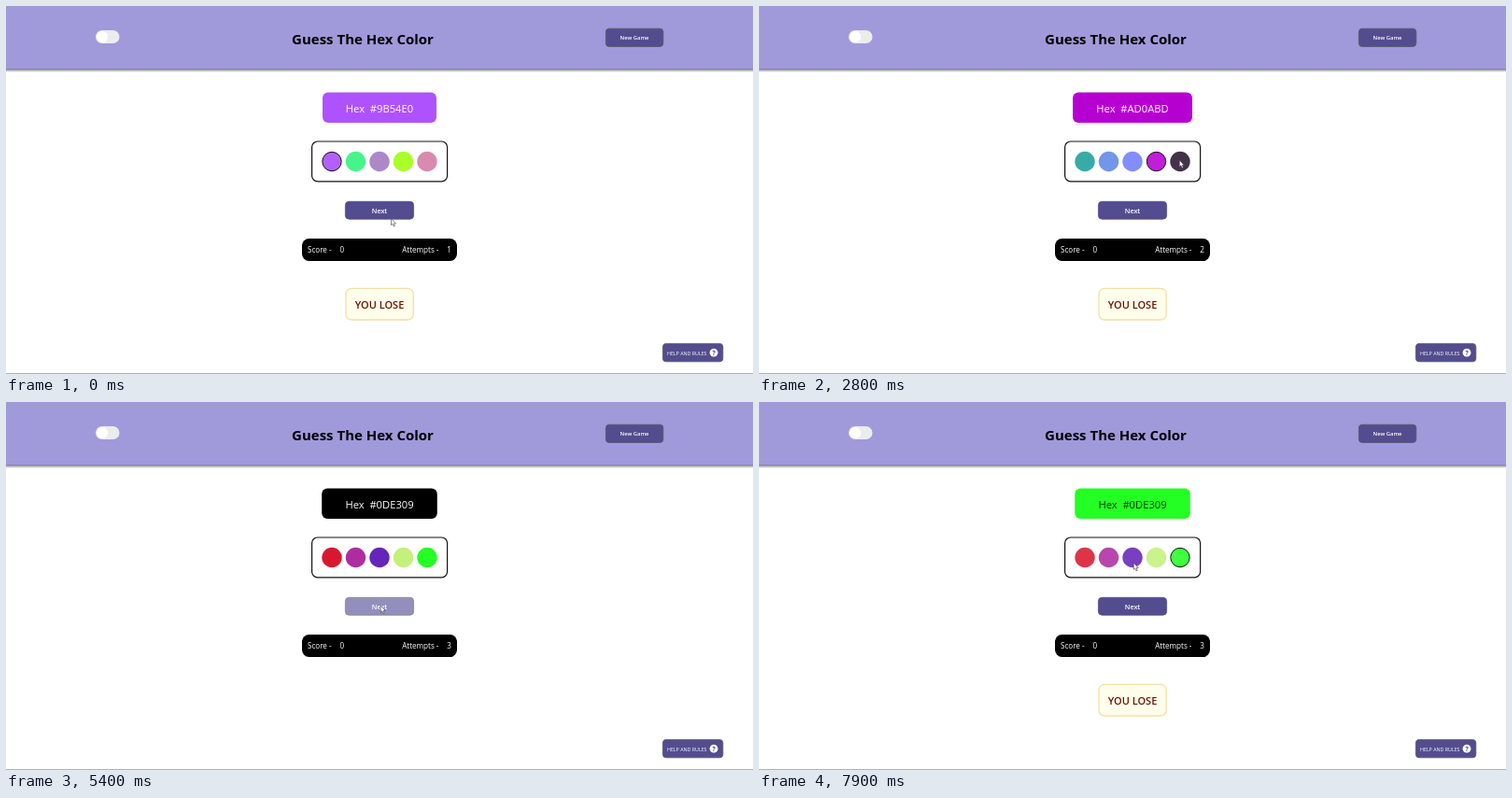
Animation, 800 px wide and 394 px high, one loop 8 s. Source, as an HTML page:

```html
<!DOCTYPE html>
<html lang="en">
<head>
<meta charset="utf-8">
<title>Guess The Hex Color</title>
<style>
  html, body { margin: 0; width: 100%; height: 100%; overflow: hidden; background: #fff; }
  svg { display: block; width: 800px; height: 394px; }
  text { font-family: "Open Sans", "Noto Sans", sans-serif; fill: #fff; white-space: pre; }
  .mid { text-anchor: middle; }
  .btn { fill: #534d8f; stroke: #56565f; stroke-width: .8; }
  .bar { font-size: 8.1px; font-weight: 500; }
  header { display: none; }
</style>
</head>
<body>
<svg viewBox="0 0 800 394">
  <defs>
    <linearGradient id="shade" x2="0" y2="1">
      <stop offset="0" stop-color="#55536c"/>
      <stop offset=".4" stop-color="#aaa"/>
      <stop offset="1" stop-color="#fff"/>
    </linearGradient>
  </defs>

  <rect y="67" width="800" height="4" fill="url(#shade)"/>
  <rect width="800" height="67.5" fill="#a09adb"/>
  <rect x="96" y="26" width="25.5" height="14" rx="7" fill="#ececec"/>
  <circle cx="103.2" cy="33" r="6" fill="#fff"/>
  <text class="mid" x="382" y="40.5" font-size="15" font-weight="700" style="fill:#000">Guess The Hex Color</text>
  <rect class="btn" x="642.4" y="24.2" width="61.4" height="19.2" rx="3.5"/>
  <text class="mid" x="673" y="36.2" font-size="5.9" font-weight="600">New Game</text>

  <rect id="hexBox" y="92.6" height="32.4" rx="6"/>
  <text id="hex" class="mid" x="400" y="113.6" font-size="11.2" font-weight="500"></text>

  <rect x="327.6" y="145" width="145" height="42.8" rx="6" fill="#fff" stroke="#111" stroke-width="1.2"/>
  <g id="swatches"></g>

  <rect id="next" x="363.4" y="209.3" width="73.2" height="18.9" rx="4" stroke-width=".8"/>
  <text class="mid" x="400" y="221.6" font-size="7.2" font-weight="600">Next</text>

  <rect x="317" y="249" width="166" height="24" rx="7.5"/>
  <text class="bar" x="323" y="264.4">Score -</text>
  <text class="bar" x="357.6" y="264.4">0</text>
  <text class="bar" x="424.2" y="264.4">Attempts -</text>
  <text class="bar" id="tries" x="472.2" y="264.4"></text>

  <g id="lose">
    <rect x="364" y="302.4" width="72.2" height="33.6" rx="6" fill="#fffeea" stroke="#f3dfaa" stroke-width="1.3"/>
    <text class="mid" x="400" y="323.7" font-size="11" font-weight="600" style="fill:#641508">YOU LOSE</text>
  </g>

  <rect class="btn" x="703.4" y="361.4" width="64.4" height="19.4" rx="3.5"/>
  <text x="708" y="373.6" font-size="5.3">HELP AND RULES</text>
  <circle cx="758" cy="371.2" r="4.4" fill="#fff"/>
  <text class="mid" x="758" y="373.7" font-size="6.8" font-weight="700" style="fill:#3d3870">?</text>
  <rect y="393" width="800" height="1" fill="#b2b2b2"/>

  <path id="cursor" d="M0 0V7.2L1.6 5.8L2.8 8.5L4 8L2.9 5.4H5Z" fill="#fff" stroke="#3c3c46" stroke-width=".6"/>
</svg>
<script>
const LOOP = 8000, STEP = 100;
const $ = id => document.getElementById(id);

const rounds = [
  { hex: '9B54E0', width: 122, answer: 0, box: '#ae52fe', ink: '#fff',
    colors: ['#a84afb', '#2df37c', '#a077c2', '#9eff0a', '#d37ba3'] },
  { hex: 'AD0ABD', width: 128, answer: 3, box: '#b600d2', ink: '#fff',
    colors: ['#1c9f9c', '#5f87e6', '#717eff', '#b600d2', '#2b1530'] },
  { hex: '0DE309', width: 123.6, answer: 4, box: '#24ff24', ink: '#0b3a0b',
    colors: ['#d9182f', '#ad2da0', '#6624b8', '#c3f17c', '#24ff24'] }
];

// time, round, lost
const states = [[0, 0, true], [1700, 1, false], [2500, 1, true], [4500, 2, false], [6700, 2, true]];

// time, x, y
const path = [
  [0, 412.5, 227.5], [900, 412.5, 227.5], [1100, 409.8, 221], [1700, 409.8, 221],
  [2100, 450.3, 165], [3700, 450.3, 165], [4100, 428, 170], [4300, 428, 170],
  [4400, 401.2, 218], [5900, 401.2, 218], [6100, 400, 178], [6300, 400, 178],
  [6500, 399, 169.3], [7700, 399, 169.3], [7900, 401.2, 172.2], [LOOP, 401.2, 172.2]
];

const set = (el, attrs) => {
  for (const k in attrs) el.setAttribute(k, attrs[k]);
  return el;
};

const dots = rounds[0].colors.map((_, i) => {
  const dot = document.createElementNS('http://www.w3.org/2000/svg', 'circle');
  return $('swatches').appendChild(set(dot, { cx: 349 + 25.5 * i, cy: 166.5 }));
});

function showState([, n, lost]) {
  const r = rounds[n];
  set($('hexBox'), { x: 400 - r.width / 2, width: r.width, fill: lost ? r.box : '#000' });
  $('hex').textContent = 'Hex\u00a0\u00a0#' + r.hex;
  $('hex').style.fill = lost ? r.ink : '#fff';
  $('tries').textContent = n + 1;
  set($('next'), { fill: lost ? '#534d8f' : '#948ebd', stroke: lost ? '#534d8f' : '#85838f' });
  $('lose').style.display = lost ? '' : 'none';
  dots.forEach((dot, i) => {
    const picked = lost && i === r.answer;
    set(dot, {
      fill: r.colors[i], 'fill-opacity': lost ? .88 : 1,
      r: picked ? 10.2 : 10.7, stroke: picked ? '#111' : 'none'
    });
  });
}

function moveCursor(t) {
  const i = path.findIndex(p => p[0] > t);
  const [t0, x0, y0] = path[i - 1], [t1, x1, y1] = path[i];
  const k = (t - t0) / (t1 - t0);
  set($('cursor'), { transform: `translate(${x0 + (x1 - x0) * k} ${y0 + (y1 - y0) * k})` });
}

let shown;
function draw(now) {
  const t = Math.floor(now % LOOP / STEP) * STEP;
  const state = states.findLast(s => s[0] <= t);
  if (state !== shown) showState(shown = state);
  moveCursor(t);
}

function tick() {
  draw(performance.now());
  requestAnimationFrame(tick);
}
tick();
</script>
</body>
</html>
```
